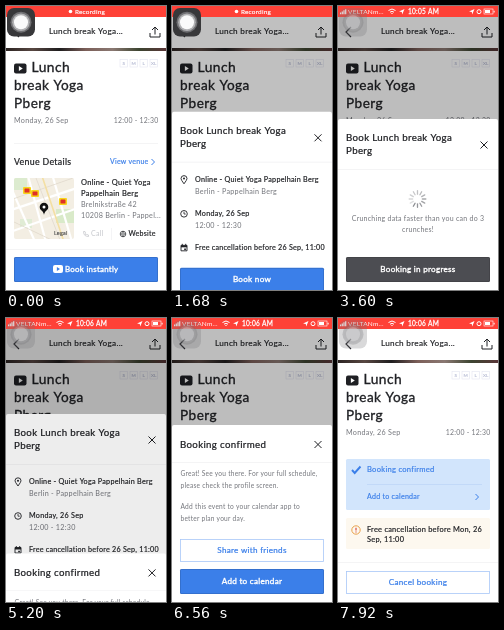
An HTML page with a canvas for the animation above (8 s loop, 160 px wide and 284 px high).

```html
<!DOCTYPE html>
<html lang="en">
<head>
<meta charset="utf-8">
<title>Yoga booking</title>
<style>
html, body { margin: 0; height: 100%; overflow: hidden; background: #fff; }
canvas { display: block; width: 160px; height: 284px; }
</style>
</head>
<body>
<canvas id="stage"></canvas>
<script>
const W = 160, H = 284, LOOP = 8000;
const INK = '#1f2024', GREY = '#73757b', BLUE = '#3b7fe9', RED = '#fe4137', LINE = '#f0f0f2';
const canvas = document.getElementById('stage');
const c = canvas.getContext('2d');
const ratio = window.devicePixelRatio || 1;
canvas.width = W * ratio;
canvas.height = H * ratio;

const clamp = v => Math.max(0, Math.min(1, v));
const ramp = (t, start, length) => clamp((t - start) / length);
const easeOut = p => 1 - (1 - p) ** 2;
const mix = (a, b, p) => a + (b - a) * p;

function rect(x, y, w, h, color, r = 0) {
  c.fillStyle = color;
  c.beginPath();
  c.roundRect(x, y, w, h, r);
  c.fill();
}

function disc(x, y, r, color) {
  c.fillStyle = color;
  c.beginPath();
  c.arc(x, y, r, 0, 7);
  c.fill();
}

function ring(x, y, r, color, width = 0.8) {
  c.strokeStyle = color;
  c.lineWidth = width;
  c.beginPath();
  c.arc(x, y, r, 0, 7);
  c.stroke();
}

function path(d, color, width = 1, dx = 0, dy = 0) {
  c.save();
  c.translate(dx, dy);
  c.strokeStyle = color;
  c.lineWidth = width;
  c.stroke(new Path2D(d));
  c.restore();
}

// y is the middle of the line; bold is the extra stroke in em
function text(str, x, y, size, color = INK, bold = 0, align = 'left') {
  c.font = `${size}px Lato, "Open Sans", sans-serif`;
  c.letterSpacing = size * 0.035 + 'px';
  c.textAlign = align;
  c.textBaseline = 'alphabetic';
  c.fillStyle = c.strokeStyle = color;
  c.fillText(str, x, y + size * 0.32);
  if (bold) {
    c.lineWidth = size * bold;
    c.strokeText(str, x, y + size * 0.32);
  }
}

const medium = (str, x, y, size, color) => text(str, x, y, size, color, 0.024);

function button(label, y, h, color, outline) {
  rect(8, y, 144, h, outline ? '#fff' : color, 1.5);
  c.strokeStyle = outline ? '#a9c7f8' : 'rgba(0,0,0,.15)';
  c.lineWidth = 0.8;
  c.strokeRect(8.5, y + 0.5, 143, h - 1);
  text(label, 80, y + h / 2, 8.1, outline ? color : '#fff', outline ? 0.03 : 0.05, 'center');
}

function playIcon(x, y, w, h, color, hole) {
  rect(x, y, w, h, color, 2);
  c.fillStyle = hole;
  c.fill(new Path2D(`M${x + w * 0.39} ${y + h * 0.25}L${x + w * 0.7} ${y + h / 2}L${x + w * 0.39} ${y + h * 0.75}Z`));
}

const chevron = (x, y, color) => path('M-1.5 -3L1.5 0L-1.5 3', color, 1, x, y);
const cross = y => path('M-3.5 -3.5L3.5 3.5M3.5 -3.5L-3.5 3.5', INK, 1, 146, y);

function pointer(x, y) {
  c.fillStyle = '#fff';
  c.fill(new Path2D(`M${x} ${y}l5.5 -2.5l-2.3 5.5l-.4 -2.5Z`));
}

function clock(x, y) {
  ring(x, y, 3.3, INK, 0.9);
  path('M0 -2V0.2H1.7', INK, 0.8, x, y);
}

function map() {
  c.save();
  c.beginPath();
  c.roundRect(8, 172, 60, 61, 2);
  c.clip();
  rect(8, 172, 60, 61, '#f3eee3');
  rect(8, 172, 13, 12, '#dcebcf');
  rect(50, 203, 18, 14, '#d9eac9');
  rect(14, 213, 12, 9, '#e0ecd5');
  path('M2 205L74 181M4 226L72 202M22 170L40 236M46 168L66 236M6 184L30 238', '#fff', 2.2);
  path('M4 194L70 171M30 172L54 234M8 216L50 236', '#e1dacd', 0.8);
  path('M36 170L58 236', '#f4dfa3', 1.6);
  for (const [x, y] of [[17, 181], [25, 184], [53, 192]]) {
    rect(x, y, 8, 7, '#f7d51d', 1);
    rect(x + 1.5, y + 1.5, 5, 4, '#df3027', 0.5);
  }
  text('Legal', 48, 227, 5.5, '#555', 0.03);
  c.fillStyle = '#111';
  c.fill(new Path2D('M34 202Q38 207 38 209Q38 207 42 202Z'));
  disc(38, 201, 4.3, '#111');
  disc(38, 201, 1.5, '#fff');
  c.restore();
}

function venue() {
  rect(8, 137, 144, 0.8, LINE);
  medium('Venue Details', 8, 156, 8.8);
  medium('View venue', 104, 156, 7, BLUE);
  chevron(147, 156, BLUE);
  map();
  medium('Online - Quiet Yoga', 75, 177, 7.5);
  medium('Pappelhain Berg', 75, 188, 7.5);
  text('Brelnikstraße 42', 75, 199, 7.2, GREY);
  text('10208 Berlin - Pappel...', 75, 210, 7.2, GREY);
  path('M-2.5 -2.5Q-2.5 2.5 2.5 2.5L2.5 1L0.8 0.4L0 1.1L-1.1 0L-0.4 -0.8L-1 -2.5Z', '#c9cbd0', 0.8, 80, 228);
  text('Call', 85, 228, 7, '#c4c6cb');
  rect(105, 222, 0.7, 12, LINE);
  ring(117, 228, 2.8, INK, 0.7);
  path('M-3 0H3M0 -3Q-2.5 0 0 3Q2.5 0 0 -3', INK, 0.5, 117, 228);
  medium('Website', 122.5, 228, 7);
  rect(0, 243, W, 0.8, LINE);
  button('', 251, 25, BLUE);
  playIcon(47, 259, 10, 8, '#fff', BLUE);
  text('Book instantly', 59, 263.5, 7.9, '#fff', 0.05);
}

function booked() {
  rect(8, 141, 144, 51, '#d2e5fc', 1.5);
  path('M-4 0L-1.3 3L4.5 -3.5', BLUE, 1.9, 18, 152);
  medium('Booking confirmed', 29, 152, 7.6, BLUE);
  rect(29, 166, 115, 0.7, '#bdd6f7');
  medium('Add to calendar', 29, 178.5, 7.1, BLUE);
  chevron(139, 179, BLUE);
  rect(8, 200, 144, 31, '#fdf8ef', 1.5);
  ring(18, 212, 4.2, '#e9a24c', 1);
  path('M0 -2.3V0.6M0 1.5V2.5', '#d33b2c', 1.1, 18, 212);
  medium('Free cancellation before Mon, 26', 29, 212, 7.4);
  medium('Sep, 11:00', 29, 222, 7.4);
  rect(0, 244, W, 0.8, LINE);
  button('Cancel booking', 253, 23, BLUE, true);
}

function page(isBooked) {
  rect(0, 0, W, H, '#fff');
  const photo = c.createLinearGradient(0, 0, W, 0);
  ['#2c2422', '#584742', '#1f1d1e', '#7c5f59', '#8a7872', '#3c4430', '#5a3638']
    .forEach((color, i) => photo.addColorStop(i / 6, color));
  rect(0, 42, W, 3, photo);
  path('M3 -5L-2 0L3 5', INK, 1.2, 10, 26);
  text('Lunch break Yoga...', 80, 25.5, 8.2, INK, 0.02, 'center');
  path('M-5 1V5H5V1M0 2.5V-5M-3 -2L0 -5L3 -2', INK, 1, 149, 26);

  playIcon(8, 57.5, 12.5, 10, INK, '#fff');
  medium('Lunch', 25.5, 62, 13.8);
  medium('break Yoga', 8, 80, 13.6);
  medium('Pberg', 8, 97.5, 13.6);
  ['S', 'M', 'L', 'XL'].forEach((size, i) => {
    const x = 114 + i * 10;
    c.strokeStyle = '#e3e5f0';
    c.lineWidth = 0.6;
    c.strokeRect(x, 53.5, 7.5, 7.5);
    text(size, x + 3.8, 57.3, 4.6, '#b4b9d2', 0.03, 'center');
  });
  text('Monday, 26 Sep', 8, 114.5, 7.2, GREY);
  text('12:00 - 12:30', 152.5, 114.5, 6.9, GREY, 0, 'right');
  if (isBooked) booked(); else venue();
}

function dim(amount) {
  rect(0, 0, W, H, `rgba(0,0,0,${0.26 * amount})`);
}

function bookingHead() {
  rect(0, 0, W, H, '#fff', 2);
  medium('Book Lunch break Yoga', 8, 19, 9.7);
  medium('Pberg', 8, 32, 9.7);
  cross(26);
  rect(0, 50, W, 0.7, LINE);
}

function detailsSheet(top) {
  c.save();
  c.translate(0, top);
  bookingHead();
  path('M0 4Q-3 0 -3 -1.2A3 3 0 0 1 3 -1.2Q3 0 0 4Z', INK, 0.9, 12, 68);
  disc(12, 66.8, 1, INK);
  medium('Online - Quiet Yoga Pappelhain Berg', 23, 68, 7.2);
  text('Berlin - Pappelhain Berg', 23, 80, 7.2, GREY);
  clock(12, 102);
  medium('Monday, 26 Sep', 23, 102, 7.2);
  text('12:00 - 12:30', 23, 113.5, 7.2, GREY);
  path('M-3 -2.5H3V3H-3ZM-1.7 -4V-2M1.7 -4V-2', INK, 0.9, 12, 136);
  rect(9, 133.5, 6, 2, INK);
  rect(12.2, 136.7, 1.7, 1.5, INK);
  medium('Free cancellation before 26 Sep, 11:00', 23, 136, 7.15);
  button('Book now', 156, 24, BLUE);
  c.restore();
}

function progressSheet(top, t) {
  c.save();
  c.translate(0, top);
  bookingHead();
  c.restore();
  const step = Math.floor(t / 83);
  for (let i = 0; i < 12; i++) {
    c.save();
    c.translate(79.5, 193);
    c.rotate(i * Math.PI / 6);
    const age = (step - i + 1200) % 12;
    rect(-0.65, -9, 1.3, 4.8, `rgba(90,92,98,${0.7 - age * 0.045})`, 0.7);
    c.restore();
  }
  text('Crunching data faster than you can do 3', 80, 213, 7, GREY, 0, 'center');
  text('crunches!', 80, 224, 7, GREY, 0, 'center');
  button('Booking in progress', 251, 25, '#4c4d52');
}

function confirmedSheet(top) {
  c.save();
  c.translate(0, top);
  rect(0, 0, W, H, '#fff', 2);
  medium('Booking confirmed', 8, 19.5, 9.7);
  cross(19.5);
  rect(0, 37, W, 0.7, LINE);
  ['Great! See you there. For your full schedule,', 'please check the profile screen.',
    'Add this event to your calendar app to', 'better plan your day.']
    .forEach((line, i) => text(line, 8.5, [49, 60.5, 82, 94][i], 6.6, GREY));
  button('Share with friends', 114, 23, BLUE, true);
  button('Add to calendar', 144, 25, BLUE);
  c.restore();
}

function statusBar(t) {
  rect(0, 0, W, 11, RED);
  if (t < 2640) {
    disc(64.5, 5.5, 1.8, '#fff');
    text('Recording', 69, 5.5, 6.4, '#fff', 0.03);
    return;
  }
  for (let i = 0; i < 4; i++) rect(2 + i * 1.7, 6.5 - i * 1.1, 1.2, 1.7 + i * 1.1, '#fff');
  text('VELTANm...', 10, 5.5, 6.5, '#fff');
  path('M-3.5 -1Q0 -4 3.5 -1M-2 0.7Q0 -1 2 0.7M-0.6 2H0.6', '#fff', 1, 54, 5.5);
  pointer(61, 5.5);
  text(t < 4700 ? '10:05 AM' : '10:06 AM', 70, 5.5, 6.6, '#fff', 0.04);
  pointer(131, 5.5);
  ring(141, 5.7, 2, '#fff', 1);
  c.strokeStyle = '#fff';
  c.lineWidth = 0.6;
  c.strokeRect(146, 3, 9, 5);
  rect(147, 4, 5, 3, '#fff');
  rect(155.6, 4.7, 1, 1.8, '#fff');
}

function touchButton(t) {
  c.save();
  c.globalAlpha = mix(1, 0.28, ramp(t, 2500, 400));
  rect(1, 2, 28, 28.5, t < 2900 ? '#38383a' : '#77777a', 7);
  disc(15, 16.2, 10.5, '#707073');
  disc(15, 16.2, 8.8, '#b1b1b3');
  disc(15, 16.2, 7, '#fafafa');
  c.restore();
}

function draw(t) {
  c.setTransform(ratio, 0, 0, ratio, 0, 0);
  page(t > 5700);

  const open = easeOut(ramp(t, 1249, 560));
  const leave = ramp(t, 5280, 400) ** 2;
  const confirm = easeOut(ramp(t, 5118, 560));
  const close = easeOut(ramp(t, 6800, 360));

  dim(open * (1 - leave));
  if (t >= 2840 && t < 4960) {
    progressSheet(mix(96, 113, easeOut(ramp(t, 2840, 160))), t);
  } else if (open > 0 && leave < 1) {
    detailsSheet(mix(H, 96, open) + 188 * leave);
  }
  dim(confirm * (1 - close));
  if (confirm > 0 && close < 1) confirmedSheet(mix(mix(H, 107, confirm), H, close));

  statusBar(t);
  touchButton(t);
}

const begin = performance.now();
function tick() {
  draw((performance.now() - begin) % LOOP);
  requestAnimationFrame(tick);
}
tick();
</script>
</body>
</html>
```
